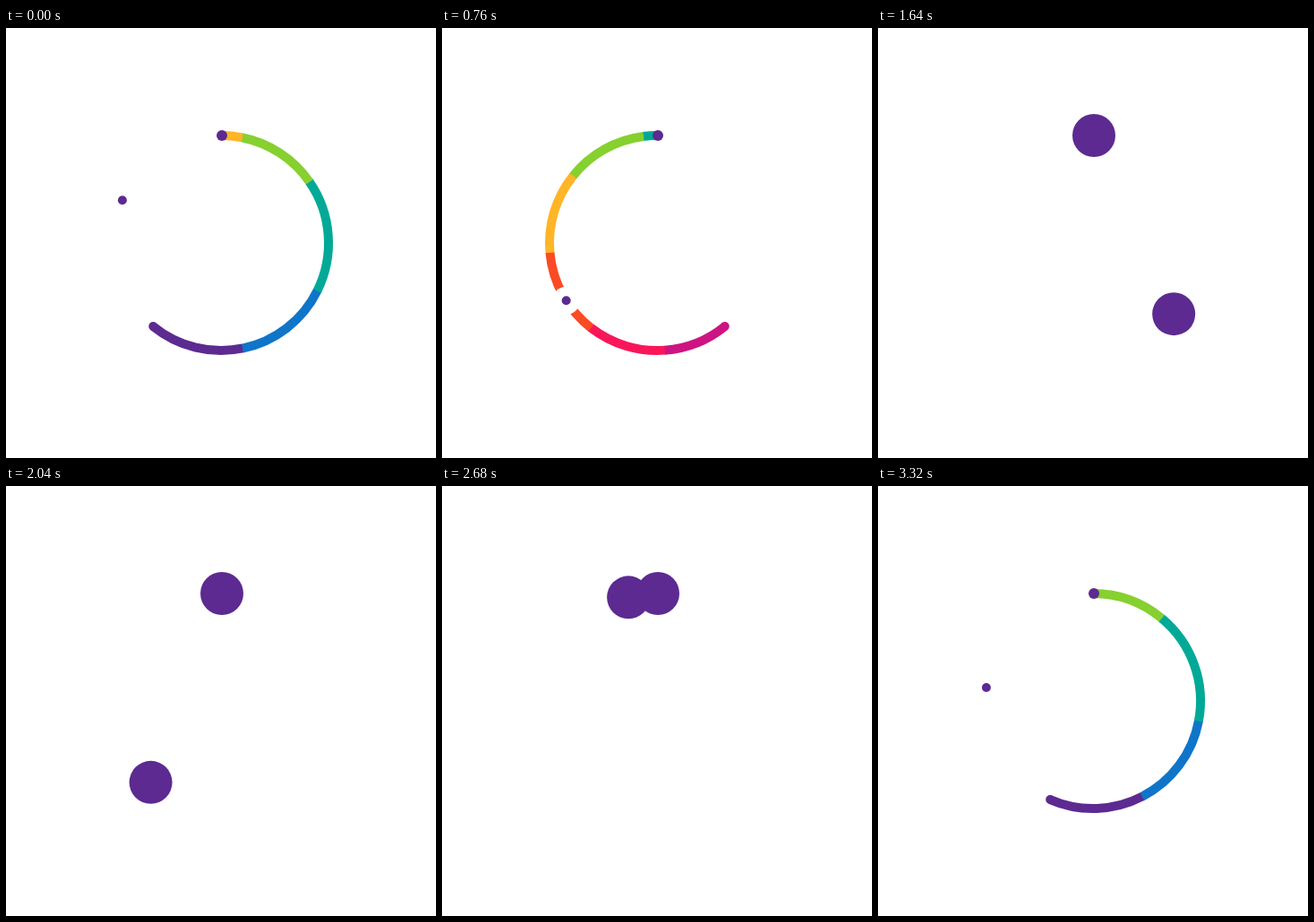
Recreate the animation shown at these times as an HTML page. Size 480 by 480 pixels, loop 3.36 s.

```html
<!DOCTYPE html>
<html lang="en">
<head>
<meta charset="utf-8">
<title>Orbiting dots</title>
<style>
  html, body { margin: 0; width: 100%; height: 100%; overflow: hidden; background: #fff; }
  svg { display: block; width: 100vw; height: 100vh; }
</style>
</head>
<body>
<svg id="stage" viewBox="0 0 480 480"></svg>
<script>
const STEP = 40, STEPS = 84, START = 14;
const CENTER = 240, ORBIT = 120, THIN = 5, LARGE = 24, ANCHOR = 6;
const PURPLE = '#5c2a91';
const SPEED = 360 / 23; // train speed, degrees per step

// Train colours from head to tail; "end" is the distance behind the head in degrees.
const segments = [
  { color: PURPLE, end: 51 },
  { color: '#0f75c9', end: 103 },
  { color: '#03a997', end: 164 },
  { color: '#86d030', end: 208 },
  { color: '#ffb526', end: 252 },
  { color: '#fb4b24', end: 299 },
  { color: '#f9175a', end: 341 },
  { color: '#cd1482', end: 24 * SPEED }
];

// Moving dot: [step, angle, degrees per step]
const orbitKeys = [
  [0, 0, 26], [13, 277.2, 16.2], [25, 471.8, 16.1], [41, 719, 15], [42, 732.5, 9.4],
  [55, 851.3, 9.15], [65, 940.8, 8.7], [70, 983.2, 8.3], [81, 1064.6, 6.4], [84, 1080, 3.6]
];

const stage = document.getElementById('stage');

function add(tag, attrs) {
  const node = document.createElementNS('http://www.w3.org/2000/svg', tag);
  set(node, attrs);
  return stage.appendChild(node);
}

function set(node, attrs) {
  for (const key in attrs) node.setAttribute(key, attrs[key]);
}

function pointAt(degrees) {
  const a = degrees * Math.PI / 180;
  return [CENTER + ORBIT * Math.sin(a), CENTER - ORBIT * Math.cos(a)];
}

function ramp(n, from, to, a, b) {
  const u = Math.min(1, Math.max(0, (n - from) / (to - from)));
  return a + (b - a) * u;
}

function hermite(keys, n) {
  const i = Math.max(1, keys.findIndex(key => key[0] >= n));
  const [n0, a0, v0] = keys[i - 1], [n1, a1, v1] = keys[i];
  const span = n1 - n0, u = (n - n0) / span, w = 1 - u;
  return a0 * (1 + 2 * u) * w * w + v0 * span * u * w * w
       + a1 * u * u * (3 - 2 * u) - v1 * span * u * u * w;
}

function placeCircle(node, degrees, r) {
  const [cx, cy] = pointAt(degrees);
  set(node, { cx, cy, r });
}

function arc(from, to) {
  if (to <= from) return '';
  const large = to - from > 180 ? 1 : 0;
  return `M${pointAt(from)} A${ORBIT} ${ORBIT} 0 ${large} 1 ${pointAt(to)}`;
}

const clampLap = degrees => Math.min(360, Math.max(0, degrees));
const inLap = degrees => degrees > 0 && degrees < 360;

const arcs = segments.map(({ color }) =>
  add('path', { fill: 'none', stroke: color, 'stroke-width': THIN * 2 }));
const headCap = add('circle', { fill: PURPLE });
const tailCap = add('circle', { fill: segments[segments.length - 1].color });
const halo = add('circle', { fill: '#fff' });
const mover = add('circle', { fill: PURPLE });
const anchor = add('circle', { fill: PURPLE, cx: 241, cy: 120 });

function draw(n) {
  const head = n * SPEED;
  let begin = 0;
  segments.forEach(({ end }, i) => {
    const from = clampLap(head - end), to = clampLap(head - begin + (i ? 0.3 : 0));
    arcs[i].setAttribute('d', arc(from, to));
    begin = end;
  });
  const tail = head - begin;
  placeCircle(headCap, head, inLap(head) ? THIN : 0);
  placeCircle(tailCap, tail, inLap(tail) ? THIN : 0);

  const angle = hermite(orbitKeys, n);
  const radius = n < 42 ? ramp(n, 0, 3.6, LARGE, THIN) : ramp(n, 42, 55, THIN, LARGE);
  placeCircle(halo, angle, 15.5);
  placeCircle(mover, angle, radius);
  anchor.setAttribute('r', n < 41 ? ramp(n, 0, 4, LARGE, ANCHOR) : ramp(n, 41, 54, ANCHOR, LARGE));
}

const startTime = performance.now();
function tick() {
  const elapsed = Math.max(0, performance.now() - startTime);
  draw((Math.floor(elapsed / STEP) + START) % STEPS);
  requestAnimationFrame(tick);
}
tick();
</script>
</body>
</html>
```
